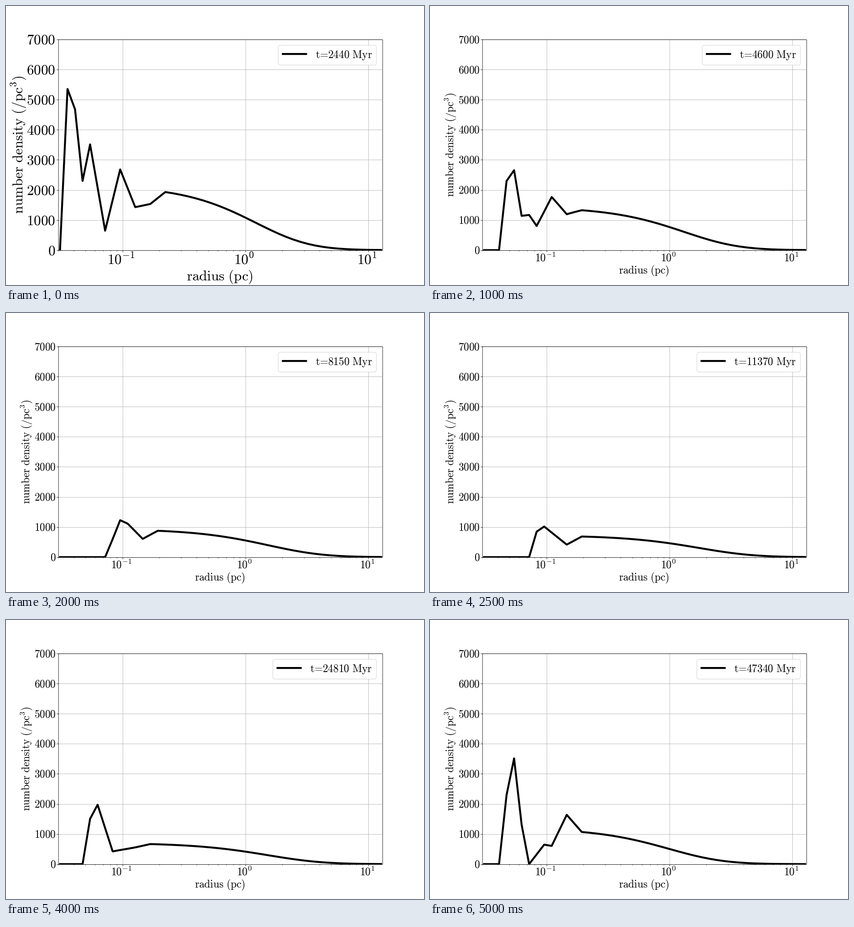
A matplotlib script for the animation above (5.5 s loop, 917 by 611 pixels).

```python
import numpy as np
import matplotlib.pyplot as plt
from matplotlib.animation import FuncAnimation
from matplotlib.patches import FancyBboxPatch, Rectangle

W, H, DPI = 917, 611, 64
PX = 72 / DPI            # points per pixel
UNIT = W / 864           # stage pixels per layout unit
LEFT, RIGHT, TOP, BOTTOM = 0.125 * W, 0.9 * W, 0.12 * H, 0.875 * H
R_MIN, R_MAX, N_MAX = 0.03, 13, 7000
SMALL, BIG = 23.3, 31    # text sizes in pixels
EM = 24 * UNIT           # legend spacing
STEPS = 11

plt.rcParams["mathtext.fontset"] = "cm"

# Shells evenly spaced in log radius; one star weighs less in a larger shell
SHELLS = np.arange(45)
R = 0.031 * 10 ** (SHELLS * 3 / 49)
PER_STAR = 1785 * (R / R[1]) ** -3

# Cluster as a whole: time, central density and core radius at key steps
KEYS = [0, 1, 3, 5, 7, 9, 10]
TIME = [2440, 3630, 5840, 11370, 17980, 34230, 47340]
CENTRE = [2150, 1710, 1210, 725, 660, 750, 1200]
CORE = [2.84, 2.95, 3.2, 4.05, 4.0, 3.1, 2.32]

# Turning points near the centre, as {shell: stars}
CLUMPS = {
    0: {1: 3, 2: 4, 3: 3, 4: 7, 6: 3, 8: 29, 10: 36, 12: 90},
    1: {3: 3, 4: 7, 5: 4, 6: 9, 8: 12, 9: 34},
    3: {3: 3, 4: 4, 5: 3, 7: 3, 8: 16, 9: 25, 11: 34},
    5: {7: 6, 8: 11, 11: 16},
    7: {2: 3, 3: 4, 4: 0, 7: 0, 8: 3, 9: 13},
    8: {4: 3, 5: 6, 7: 3, 10: 14},
    9: {4: 3, 5: 10, 6: 11, 7: 4, 10: 6, 12: 30},
    10: {3: 3, 4: 7, 5: 4, 6: 0, 8: 7, 9: 10, 11: 63},
}


def density(step):
    """Smooth cored profile with clumps inside; empty within the first clump."""
    if step not in CLUMPS:
        return np.sqrt(density(step - 1) * density(step + 1))
    core = np.interp(step, KEYS, CORE)
    smooth = np.interp(step, KEYS, CENTRE) * (1 + (R / core) ** 1.3) ** -3
    clumps = CLUMPS[step]
    inner = list(clumps)
    join = inner[-1] + 2
    knots = [inner[0] - 1, *inner, *SHELLS[join:]]
    values = [0, *(clumps[k] * PER_STAR[k] for k in inner), *smooth[join:]]
    return np.interp(SHELLS, knots, values)


def time_at(step):
    return int(round(np.exp(np.interp(step, KEYS, np.log(TIME))), -1))


def x_px(r):
    return LEFT + (RIGHT - LEFT) * np.log(r / R_MIN) / np.log(R_MAX / R_MIN)


def y_px(n):
    return BOTTOM - (BOTTOM - TOP) * n / N_MAX


def crisp(v):
    """Centre of the layout cell that a thin line falls on."""
    return (np.floor(v / UNIT + 0.5) + 0.5) * UNIT


def roman(text):
    return r"$\mathrm{" + text.replace(" ", r"\ ") + "}$"


fig = plt.figure(figsize=(W / DPI, H / DPI), dpi=DPI, facecolor="white")
stage = fig.add_axes([0, 0, 1, 1])
stage.set_xlim(0, W)
stage.set_ylim(H, 0)
stage.axis("off")


def line(xs, ys, color="black", width=0.8, zorder=2.5, cap="butt"):
    return stage.plot(xs, ys, color=color, lw=width * UNIT * PX, zorder=zorder,
                      solid_capstyle=cap, solid_joinstyle="round", snap=False)[0]


def label(text, ha="center", **kw):
    return stage.text(0, 0, roman(text), ha=ha, va="baseline",
                      fontsize=SMALL * PX, color="black", **kw)


# Grid, ticks and frame
x0, x1, y0, y1 = (crisp(v) for v in (LEFT, RIGHT, BOTTOM, TOP))
y_ticks, x_ticks = [], []
for n in range(0, N_MAX + 1, 1000):
    y = crisp(y_px(n))
    line([LEFT, RIGHT], [y, y], "#b0b0b0", zorder=1)
    line([x0 - 3.5 * UNIT, x0], [y, y])
    y_ticks.append((n, label(str(n), ha="right")))
for power in (-2, -1, 0, 1):
    for m in range(1, 10):
        r = m * 10.0 ** power
        if not R_MIN * 0.999 < r < R_MAX:
            continue
        x = crisp(x_px(r))
        line([x, x], [y0, y0 + (3.5 if m == 1 else 2) * UNIT],
             width=0.8 if m == 1 else 0.6)
        if m == 1:
            line([x, x], [TOP, BOTTOM], "#b0b0b0", zorder=1)
            x_ticks.append((r, label("10^{%d}" % power)))
line([x0, x1, x1, x0, x0], [y0, y0, y1, y1, y0], cap="projecting")

x_label = label("radius (pc)")
y_label = label("number density (/pc^3)", rotation=90, rotation_mode="anchor")

curve = line(x_px(R), y_px(density(0)), width=4, zorder=2, cap="projecting")
curve.set_clip_path(Rectangle((LEFT, TOP), RIGHT - LEFT, BOTTOM - TOP,
                              transform=stage.transData))

box = FancyBboxPatch((0, 0), 1, 1, boxstyle=f"round,pad=0,rounding_size={0.2 * EM}",
                     fc="white", ec="0.8", lw=UNIT * PX, alpha=0.8, zorder=3)
stage.add_patch(box)
handle = line([], [], width=4, zorder=4, cap="projecting")
legend_text = label("", ha="left", zorder=4)


def place_axis_text(big):
    size = BIG if big else SMALL
    for text in [t for _, t in y_ticks + x_ticks] + [x_label, y_label]:
        text.set_fontsize(size * PX)
    for n, text in y_ticks:
        text.set_position((108 if big else 109.5, y_px(n) + 0.34 * size))
    for r, text in x_ticks:
        text.set_position((x_px(r) - 0.105 * size, 565.5 if big else 559))
    x_label.set_position(((LEFT + RIGHT) / 2 - 1, 600.7 if big else 586))
    y_label.set_position((36 if big else 52, (TOP + BOTTOM) / 2))


def place_legend(time):
    right, top = RIGHT - EM / 2, TOP + EM / 2
    left = right - 215.4 - 11.7 * (len(str(time)) - 4)
    box.set_bounds(left, top, right - left, 43.3)
    start = left + 0.4 * EM
    handle.set_data([start, start + 2 * EM], [99 * UNIT] * 2)
    legend_text.set_position((start + 2.8 * EM, 114))
    legend_text.set_text(roman(r"t\hspace{-0.2}=\hspace{-0.2}%d Myr" % time))


def draw(step):
    curve.set_ydata(y_px(density(step)))
    place_axis_text(step == 0)
    place_legend(time_at(step))
    return []


anim = FuncAnimation(fig, draw, frames=STEPS, interval=500,
                     init_func=lambda: draw(0), repeat=True, repeat_delay=0)
plt.show()
```
